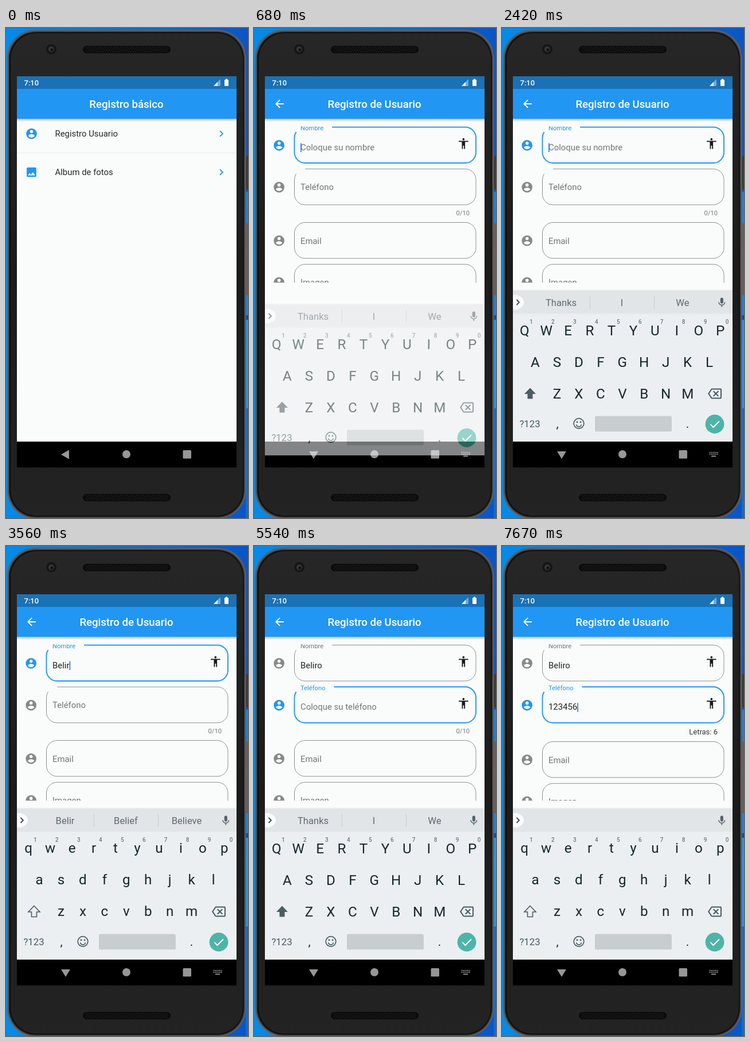
An HTML page with a canvas that plays this animation: 422x853 px, repeating every 8000 ms.

```html
<!DOCTYPE html>
<html lang="es">
<head>
<meta charset="utf-8">
<title>Registro</title>
<style>
html, body { margin: 0; width: 100%; height: 100%; overflow: hidden; background: #0a78dc; }
canvas { display: block; width: 422px; height: 853px; }
</style>
</head>
<body>
<canvas id="stage" width="422" height="853"></canvas>
<script>
const W = 422, H = 853, LOOP = 8000;
const BLUE = '#2196f3', PAGE = '#fafbfb', GREY = '#757575', INK = '#25282a';
const main = document.getElementById('stage').getContext('2d');
const layerCtx = Object.assign(document.createElement('canvas'), { width: W, height: H }).getContext('2d');
let c = main;

const ICONS = {
  person: 'M12 2a10 10 0 1 0 0 20a10 10 0 1 0 0-20zm0 3a3 3 0 1 1 0 6a3 3 0 1 1 0-6zm0 14.2c-2.5 0-4.71-1.28-6-3.22.03-1.99 4-3.08 6-3.08s5.97 1.09 6 3.08c-1.29 1.94-3.5 3.22-6 3.22z',
  image: 'M21 19V5c0-1.1-.9-2-2-2H5c-1.1 0-2 .9-2 2v14c0 1.1.9 2 2 2h14c1.1 0 2-.9 2-2zM8.5 13.5l2.5 3L14.5 12l4.5 6H5z',
  body: 'M12 2a2 2 0 1 1 0 4a2 2 0 1 1 0-4zm9 7h-6v13h-2v-6h-2v6H9V9H3V7h18z',
  chevron: 'M10 6L8.6 7.4 13.2 12l-4.6 4.6L10 18l6-6z',
  back: 'M20 11H7.83l5.59-5.59L12 4l-8 8 8 8 1.41-1.41L7.83 13H20z',
  mic: 'M12 14c1.66 0 3-1.34 3-3V5a3 3 0 0 0-6 0v6c0 1.66 1.34 3 3 3zm5.3-3c0 3-2.54 5.1-5.3 5.1S6.7 14 6.7 11H5c0 3.4 2.7 6.2 6 6.7V21h2v-3.3c3.3-.5 6-3.3 6-6.7z',
  erase: 'M22 3H7c-.7 0-1.2.35-1.6.9L0 12l5.4 8.1c.4.5.9.9 1.6.9h15a2 2 0 0 0 2-2V5a2 2 0 0 0-2-2zm0 16H7.1L2.4 12 7.1 5H22zM10.4 17L14 13.4l3.6 3.6 1.4-1.4-3.6-3.6L19 8.4 17.6 7 14 10.6 10.4 7 9 8.4l3.6 3.6L9 15.6z'
};
for (const k in ICONS) ICONS[k] = new Path2D(ICONS[k]);

const clamp = x => Math.max(0, Math.min(1, x));
const lerp = (a, b, p) => a + (b - a) * p;

function bezier(x1, x2, p) {
  p = clamp(p);
  let lo = 0, hi = 1, s = .5;
  for (let i = 0; i < 24; i++) {
    s = (lo + hi) / 2;
    const x = 3 * x1 * s * (1 - s) ** 2 + 3 * x2 * s * s * (1 - s) + s ** 3;
    if (x < p) lo = s; else hi = s;
  }
  return 3 * s * s * (1 - s) + s ** 3;
}
const glide = p => bezier(.4, .2, p);
const easeIn = p => bezier(.42, 1, p);

function rect(x, y, w, h, col) { c.fillStyle = col; c.fillRect(x, y, w, h); }
function pill(x, y, w, h, r, col) {
  c.fillStyle = col; c.beginPath(); c.roundRect(x, y, w, h, r); c.fill();
}
function disc(x, y, r, col) {
  c.fillStyle = col; c.beginPath(); c.arc(x, y, r, 0, 7); c.fill();
}
function poly(col, ...p) {
  c.fillStyle = col; c.beginPath();
  for (let i = 0; i < p.length; i += 2) c.lineTo(p[i], p[i + 1]);
  c.closePath(); c.fill();
}
function line(col, width, ...p) {
  c.strokeStyle = col; c.lineWidth = width; c.beginPath();
  for (let i = 0; i < p.length; i += 2) c.lineTo(p[i], p[i + 1]);
  c.stroke();
}
function setFont(size, weight = 400) { c.font = `${weight} ${size}px Roboto, sans-serif`; }
function text(s, x, y, size, col, align = 'left', weight = 400) {
  setFont(size, weight);
  c.fillStyle = col; c.textAlign = align; c.fillText(s, x, y);
}
function icon(name, x, y, col, size = 22.3) {
  c.save();
  c.translate(x - size / 2, y - size / 2);
  c.scale(size / 24, size / 24);
  c.fillStyle = col; c.fill(ICONS[name], 'evenodd');
  c.restore();
}
function faded(alpha, draw) {
  c.save(); c.globalAlpha *= clamp(alpha); draw(); c.restore();
}
// Draws a group flat, then blends it as a whole.
function group(alpha, dy, draw) {
  c = layerCtx;
  c.clearRect(0, 0, W, H);
  c.save(); c.translate(0, dy); draw(); c.restore();
  c = main;
  faded(alpha, () => c.drawImage(layerCtx.canvas, 0, 0));
}

function desktop() {
  const g = c.createLinearGradient(0, 0, W, 0);
  g.addColorStop(0, '#078ae6'); g.addColorStop(1, '#0a55c6');
  rect(0, 0, W, H, g);
  rect(418, 285, 4, 215, '#1585e6');
  rect(418, 508, 4, 154, '#1c9bee');
  rect(418, 662, 4, 191, '#0c6cd6');
  rect(417, 223, 5, 58, '#3c3a3a');
  rect(417, 340, 5, 125, '#6a5c5c');
  rect(417, 500, 5, 8, '#0d4f96');
}
function speaker(y) {
  pill(134, y, 153, 13, 6.5, '#0b0b0b');
  c.fillStyle = '#292929';
  for (let r = 0; r < 4; r++)
    for (let x = 139 + r % 2 * 2; x < 283; x += 4) c.fillRect(x, y + 2 + r * 2.6, 1.6, 1.3);
}
function phone() {
  pill(2, 3, 416.5, 851, 49, '#5f5c5b');
  pill(4.5, 6, 411.5, 846, 47, '#34302f');
  pill(6, 7.5, 408.5, 843, 46, '#0d0d0d');
  const g = c.createLinearGradient(0, 0, 0, H);
  g.addColorStop(0, '#272727'); g.addColorStop(.5, '#1b1b1b'); g.addColorStop(1, '#232323');
  pill(8, 9, 405, 840, 45, g);
  disc(79, 37, 9, '#161616');
  disc(79, 37, 5, '#33373a');
  disc(80, 38, 2.5, '#111');
  speaker(31);
  speaker(811);
}
function statusBar() {
  rect(19, 84, 383, 22, 'rgba(0,0,0,.25)');
  text('7:10', 31.5, 100, 13, '#fff', 'left', 500);
  poly('rgba(255,255,255,.4)', 362, 101, 374, 89, 374, 101);
  poly('#fff', 362, 101, 369, 94, 369, 101);
  pill(381, 90, 7, 11, 1, '#fff');
  rect(383, 88.5, 3, 2, '#fff');
}
function navBar(withKeys) {
  const col = '#979797';
  rect(19, 720, 383, 45, '#000');
  if (withKeys) {
    poly(col, 96, 737, 112, 737, 104, 750);
    c.fillStyle = col;
    for (let r = 0; r < 2; r++)
      for (let i = 0; i < 6; i++) c.fillRect(361.5 + i * 2.7, 738 + r * 3, 1.7, 1.8);
    c.fillRect(365, 744.5, 8, 1.8);
  } else poly(col, 96, 742.5, 110, 734.5, 110, 750.5);
  disc(210, 742, 7, col);
  pill(308.5, 735, 14.5, 14.5, 1.5, col);
}
function appBar(title) {
  const g = c.createLinearGradient(0, 158, 0, 163);
  g.addColorStop(0, 'rgba(0,0,0,.24)'); g.addColorStop(1, 'rgba(0,0,0,0)');
  rect(19, 158, 383, 5, g);
  rect(19, 84, 383, 74, BLUE);
  text(title, 210, 139, 18.6, '#fff', 'center', 500);
}

function homePage() {
  rect(19, 84, 383, 636, PAGE);
  appBar('Registro básico');
  [['person', 'Registro Usuario', 184], ['image', 'Album de fotos', 251]].forEach(([ic, label, y]) => {
    icon(ic, 44.5, y, BLUE);
    text(label, 85.5, y + 5, 14.9, INK);
    icon('chevron', 375.5, y, BLUE);
  });
  rect(19, 217, 383, 1, '#e8e9e9');
}

function mix(p) {
  return `rgb(${lerp(143, 33, p)},${lerp(143, 150, p)},${lerp(143, 243, p)})`;
}
function field(y, label, o = {}) {
  const { up = 0, focus = 0, active = false, value = '', hint = '', caret = false } = o;
  const l = 70.5, r = 387, b = y + 62.5, R = 18.6;
  icon('person', 43.7, y + 31.8, active ? BLUE : '#888');

  setFont(11.2);
  const end = lerp(73, 96 + c.measureText(label).width, up);
  c.strokeStyle = mix(focus);
  c.lineWidth = 1 + .9 * focus;
  c.beginPath();
  if (up > 0) {
    c.moveTo(Math.max(end, l + R), y);
    c.arcTo(r, y, r, b, R);
    c.arcTo(r, b, l, b, R);
    c.arcTo(l, b, l, y, R);
    c.arc(l + R, y + R, R, Math.PI, Math.PI + .57);
  } else c.roundRect(l, y, r - l, 62.5, R);
  c.stroke();

  const col = up && focus > .5 ? BLUE : GREY;
  text(label, 81, y + lerp(37, 5.7, up), lerp(14.9, 11.2, up), col);
  if (hint && !value) faded(up, () => text(hint, 81, y + 40, 14.9, GREY));
  text(value, 81, y + 40, 14.9, '#202224');
  if (caret) rect(81 + c.measureText(value).width, y + 28, 1.8, 15.5, '#3d83dc');
  if (up) faded(up, () => icon('body', 365.3, y + 28.6, '#1a1a1a'));
}

const NAME = 'Beliro';
const nameTimes = [2690, 2990, 3110, 3380, 3560, 3740];
const phoneTimes = [5870, 6170, 6830, 7130, 7370, 7670];
const blinks = [[1010, 1460], [1940, 2420], [4220, 4700], [5540, 5870], [6620, 6830]];
const typed = (s, times, t) => s.slice(0, times.filter(x => t >= x).length);

function formPage(t) {
  rect(19, 84, 383, 636, PAGE);
  appBar('Registro de Usuario');
  icon('back', 44.5, 132, '#fff');

  const second = t >= 5030, swap = glide((t - 5030) / 200), first = glide((t - 470) / 200);
  const lit = !blinks.some(([a, b]) => t >= a && t < b);
  const number = typed('123456', phoneTimes, t);
  const push = number ? 2 : 0;

  c.save();
  c.beginPath();
  c.rect(19, 171.3, 383, t >= 620 ? 272 : 540);
  c.clip();
  field(172.5, 'Nombre', {
    up: first, focus: first * (1 - swap), active: !second,
    value: typed(NAME, nameTimes, t), hint: 'Coloque su nombre', caret: lit && !second
  });
  field(245.3, 'Teléfono', {
    up: swap, focus: swap, active: second,
    value: number, hint: 'Coloque su teléfono', caret: lit && second
  });
  if (number) text('Letras: ' + number.length, 376, 327.7, 13, '#303234', 'right');
  else text('0/10', 376, 326, 11.2, GREY, 'right');
  field(338.5 + push, 'Email');
  field(411.3 + push, 'Imagen');
  text('¿Tiene una imagen?', 47.5, 515, 14.9, INK);
  pill(330, 503.5, 32, 13, 6.5, '#90caf9');
  disc(354, 510, 9.3, BLUE);
  c.save();
  c.shadowColor = 'rgba(0,0,0,.3)'; c.shadowBlur = 3; c.shadowOffsetY = 2;
  pill(169, 551, 82.5, 33, 16.5, BLUE);
  c.restore();
  text('Guardar', 210, 572, 13, '#fff', 'center', 500);
  c.restore();
}

const START = ['Thanks', 'I', 'We'];
const HINTS = [[2780, 'But', 'B', 'Be'], [2990, 'Be', 'Best', 'Been'], [3110, 'Bell', 'Below', 'Belt'],
  [3380, 'Belief', 'Beli', 'Believe'], [3560, 'Belir', 'Belief', 'Believe'],
  [3740, NAME, NAME + "'s", ''], [5150, ...START], [5930, '', '', '']];

function keyRow(keys, x, y, upper) {
  [...keys].forEach((k, i) => text(upper ? k.toUpperCase() : k, x + i * 37.95, y + (upper ? 0 : -1.5), 24.2, '#14262d', 'center'));
}
function shiftKey(filled) {
  c.beginPath();
  [[49, 626.5], [59, 637], [53.5, 637], [53.5, 645.5], [44.5, 645.5], [44.5, 637], [39, 637]].forEach(p => c.lineTo(...p));
  c.closePath();
  c.fillStyle = c.strokeStyle = '#4b5c63';
  c.lineWidth = 1.6;
  if (filled) c.fill(); else c.stroke();
}
function keyboard(t) {
  const upper = t < 2750 || (t >= 5150 && t < 5930);
  const words = HINTS.reduce((w, h) => t >= h[0] ? h.slice(1) : w, START);
  const dark = '#455a62';
  rect(19, 455.5, 383, 1.5, '#eff1f1');
  rect(19, 457, 383, 263, '#eceff1');
  rect(19, 457, 383, 40.5, '#e1e5e8');
  rect(19, 465, 10, 25, '#f7f8f9');
  disc(27, 477.5, 11, '#f9fafa');
  line('#37474f', 1.8, 25.5, 473, 30, 477.5, 25.5, 482);
  words.forEach((w, i) => text(w, [103, 209, 315][i], 484, 16.6, '#5d6b72', 'center'));
  if (words[0]) [153, 265].forEach(x => rect(x, 466, 1, 23, '#c5cbce'));
  icon('mic', 383.3, 478, '#52636b', 20.5);

  keyRow('qwertyuiop', 39.2, 535, upper);
  [...'1234567890'].forEach((d, i) => text(d, 51 + i * 37.95, 515, 10, '#6d7a80', 'center', 500));
  keyRow('asdfghjkl', 58, 590, upper);
  keyRow('zxcvbnm', 96, 645, upper);
  shiftKey(upper);
  icon('erase', 371, 636.5, dark, 24);

  text('?123', 48.5, 695, 16.8, dark, 'center');
  text(',', 96.5, 696, 21, '#14262d', 'center');
  c.strokeStyle = dark; c.lineWidth = 1.7;
  c.beginPath(); c.arc(134, 688.5, 8.8, 0, 7); c.stroke();
  c.beginPath(); c.arc(134, 689.5, 4.6, .2, Math.PI - .2); c.stroke();
  disc(131, 686, 1.4, dark);
  disc(137, 686, 1.4, dark);
  pill(162, 675.5, 134, 27, 2.5, '#c8cdd0');
  text('.', 323.5, 696, 21, '#14262d', 'center');
  disc(371, 689.5, 16.4, '#4cb5a8');
  line('#fff', 2, 363.5, 690, 368.5, 695, 379, 684.5);
}

function render(time) {
  // Motion advances in steps of 30 ms.
  const t = time < 20 ? 0 : time - (time - 20) % 30;
  const open = t >= 500;
  c = main;
  desktop();
  phone();
  c.save();
  c.beginPath();
  c.rect(19, 84, 383, 681);
  c.clip();
  if (t < 650) homePage();
  if (open) {
    const p = (t - 431) / 214;
    group(easeIn(p), Math.round(170 * (1 - glide(p))), () => formPage(t));
  }
  statusBar();
  navBar(open);
  const k = clamp((t - 630) / 150), e = 1 - (1 - k) ** 2;
  if (k > 0) group(e, Math.round(54 * (1 - e)), () => keyboard(t));
  c.restore();
}

const start = performance.now();
function tick() {
  render((performance.now() - start) % LOOP);
  requestAnimationFrame(tick);
}
tick();
</script>
</body>
</html>
```
